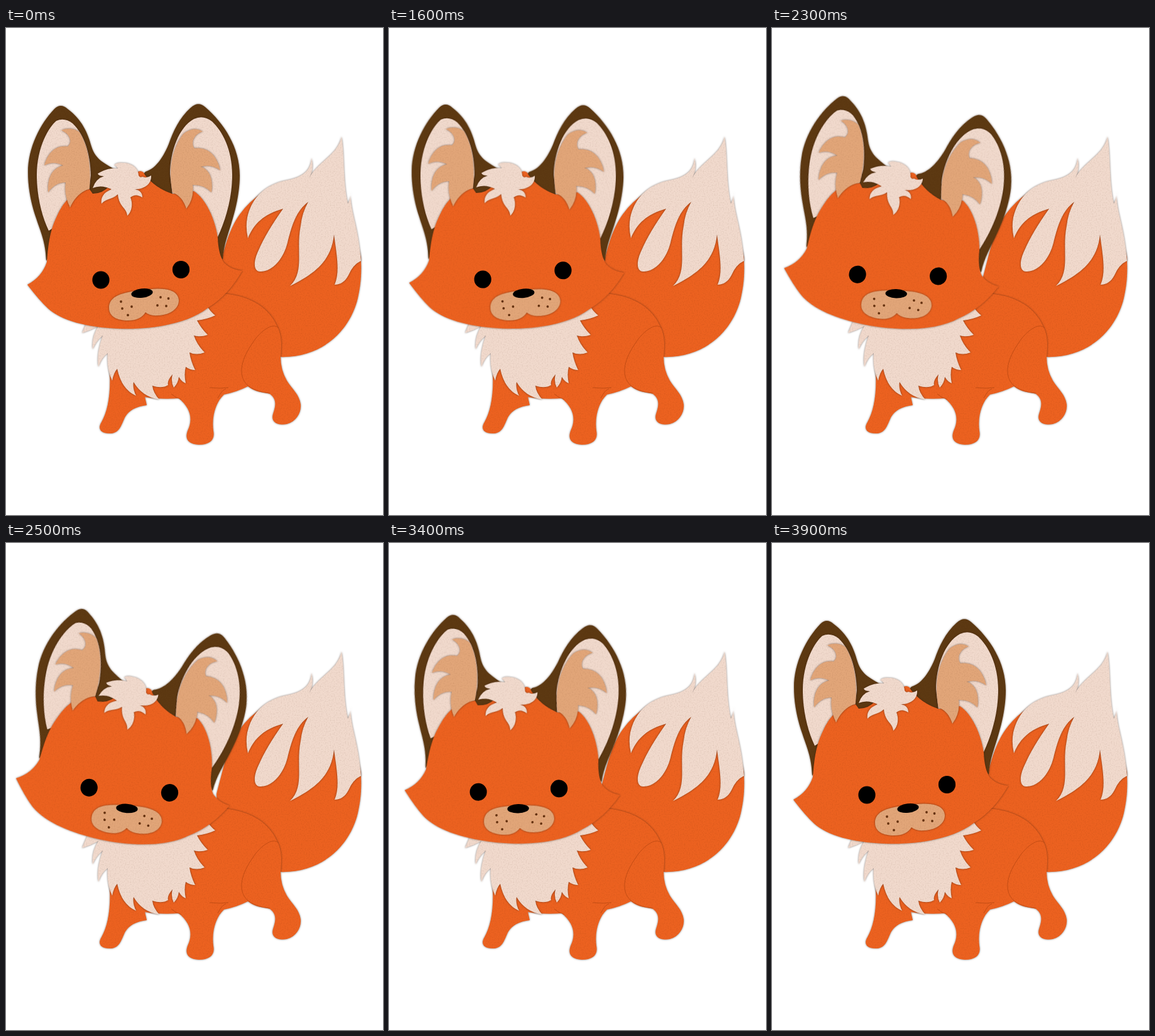
Animation, 600 px wide and 776 px high, one loop 8000 ms. Source, as an HTML page:

```html
<!DOCTYPE html>
<html lang="en">
<head>
<meta charset="utf-8">
<title>Paper fox</title>
<style>
  html, body { margin: 0; width: 100%; height: 100%; overflow: hidden; background: #fff; }
  svg { display: block; width: 100%; height: 100%; }
  .cut { filter: url(#paper); }
  .orange { fill: #ec6220; }
  .cream { fill: #f1dacd; }
  .tan { fill: #e2a679; }
  .brown { fill: #5d3912; }
  .fold { fill: none; stroke: #a83f0c; stroke-width: 1; opacity: .6; filter: url(#soft); }
</style>
</head>
<body>
<svg viewBox="0 0 600 776">
  <defs>
    <filter id="paper" x="-8%" y="-8%" width="116%" height="116%" color-interpolation-filters="sRGB">
      <feTurbulence type="fractalNoise" baseFrequency=".5" numOctaves="2" seed="4"/>
      <feColorMatrix values="0 0 0 0 .25  0 0 0 0 .08  0 0 0 0 0  .2 0 0 0 -.09"/>
      <feComposite in2="SourceGraphic" operator="in" result="grain"/>
      <feGaussianBlur in="SourceAlpha" stdDeviation="1.4"/>
      <feColorMatrix values="0 0 0 0 .2  0 0 0 0 .1  0 0 0 0 .05  0 0 0 .6 0" result="shade"/>
      <feMerge>
        <feMergeNode in="shade"/>
        <feMergeNode in="SourceGraphic"/>
        <feMergeNode in="grain"/>
      </feMerge>
    </filter>
    <filter id="soft" x="-10%" y="-10%" width="120%" height="120%"><feGaussianBlur stdDeviation=".6"/></filter>
  </defs>

  <g id="tail">
    <path class="cut orange" d="M335 400 C346 360 352 325 372 297 Q387 276 410 261 L500 240 L540 320
      Q566 350 565 372 C566 395 564 412 560 430 C547 485 500 527 434 524 L340 480Z"/>
    <path class="cut cream" d="M385 335 Q381 318 384 302 C393 262 422 247 450 242 C474 237 486 225 486 207
      Q491 224 482 240 C496 213 528 203 534 173 C539 205 536 245 544 280 Q549 272 548 261
      C548 295 560 312 565 371 Q552 377 545 394 Q537 409 523 409 C532 388 526 360 522 329
      C518 372 490 392 452 411 C476 388 461 355 469 315 Q471 295 481 277 C462 291 455 314 448 342
      C442 367 424 389 404 388 C393 387 394 371 402 354 Q414 326 441 288 C410 297 395 311 385 335Z"/>
  </g>

  <g id="body">
    <path class="cut orange" d="M165 500 L165 548 C167 583 162 611 152 628 C145 639 151 647 167 646
      C182 645 184 630 190 619 Q199 604 224 601 L221 588 Q245 592 275 590
      C294 606 298 623 289 642 C284 656 291 663 307 664 C324 664 333 657 330 642
      C327 618 334 596 347 584 Q367 580 385 571 C398 581 410 580 420 583
      C433 593 428 605 425 615 C421 628 432 634 447 631 C462 627 470 613 469 600
      C467 584 455 575 447 562 Q437 545 437 524 C439 503 439 488 430 472 C415 441 383 426 345 423 L180 450Z"/>
    <path class="fold" d="M434 478 C424 468 404 484 393 501 C376 525 367 552 384 569 Q396 580 420 582"/>
    <path class="fold" d="M354 573 Q339 575 324 573 M350 575 Q343 577 337 590 M263 583 Q269 589 279 592"/>
    <path class="cut cream" d="M130 465 L121 486 Q134 482 147 475 Q136 492 138 512 Q143 499 154 490
      Q144 518 147 540 Q152 525 162 518 Q160 543 169 562 Q171 550 177 543 Q184 576 207 586
      Q201 574 203 564 Q217 588 244 592 Q234 581 233 570 Q248 575 258 569 Q256 562 265 552
      Q262 563 267 573 Q274 566 275 556 Q280 564 286 566 Q283 552 286 540 Q293 545 301 545
      Q294 531 292 517 Q303 522 316 517 Q304 505 299 490 Q309 493 321 489 Q310 478 304 466
      Q320 464 333 458 Q325 452 318 440Z"/>
  </g>

  <g id="head">
    <path class="cut brown" d="M64 371 C63 340 55 325 48 303 C40 280 35 255 35 230 C35 190 55 152 77 129
      Q87 119 98 129 C121 146 130 167 136 189 C143 211 157 215 174 226 L190 280 L100 310Z"/>
    <path class="cut brown" d="M345 369 C346 345 355 325 361 303 C368 280 372 255 372 235 C372 190 347 152 317 126
      Q306 116 294 127 C276 143 266 165 259 185 C252 202 240 224 222 229 L212 240 L240 290 L320 340Z"/>
    <path class="cut cream" d="M68 323 C57 300 49 268 49 234 C49 190 68 158 80 148 Q93 142 106 152
      C126 171 134 202 135 235 L130 275 L90 310Z"/>
    <path class="cut cream" d="M337 333 C350 305 360 270 360 234 C360 193 344 164 328 149 Q314 138 299 145
      C275 158 261 197 261 233 L266 275 L310 310Z"/>
    <path class="cut orange" d="M65 373 C67 348 69 325 80 302 Q89 280 106 265 Q117 259 133 257 L138 264
      Q154 264 164 252 L202 240 Q206 229 213 228 Q219 228 221 234 Q230 245 240 252 Q250 259 264 264
      Q284 265 299 260 C318 272 333 305 337 334 Q338 361 347 374 Q358 385 376 387
      C361 413 344 432 320 447 C290 470 235 481 179 479 C128 477 88 466 67 447 Q53 434 34 409 Q57 397 65 373Z"/>
    <path class="cut tan" d="M88 163 Q104 157 117 166 C129 186 136 215 133 256 Q112 263 102 286
      Q92 266 95 246 Q78 246 67 262 C66 240 72 224 91 219 Q75 211 61 219 C66 200 79 186 98 189
      C107 181 101 168 88 163Z"/>
    <path class="cut tan" d="M313 165 Q298 156 282 169 C266 191 257 220 265 262 Q281 268 287 288
      Q300 271 297 250 Q315 249 327 262 C330 240 324 226 310 221 Q327 216 341 227
      C336 203 321 189 300 192 C293 183 299 169 313 165Z"/>
    <path class="cut cream" d="M172 219 Q176 214 186 215 C200 215 211 223 211 235 Q213 239 217 237
      Q224 240 231 235 C232 249 220 257 205 257 Q217 259 217 270 Q206 263 198 270
      C203 282 199 294 193 299 C192 286 180 286 178 265 C170 273 160 271 152 280
      C150 268 158 261 168 257 Q152 249 138 255 Q143 240 156 236 Q147 236 146 232
      C158 225 166 223 178 224 Q176 219 172 219Z"/>

    <g id="eyes">
      <ellipse cx="151" cy="401.5" rx="13.6" ry="14"/>
      <ellipse cx="278.5" cy="385" rx="13.6" ry="14"/>
    </g>
    <g id="lids" fill="none" stroke="#000" stroke-width="3" stroke-linecap="round">
      <path d="M136 404 Q152 416 166 400"/>
      <path d="M264 388 Q280 399 292 384"/>
    </g>

    <path class="cut tan" d="M164 446 C164 427 185 421 216 418 C244 413 274 414 275 434
      C275 449 258 458 241 458 Q229 459 222 453 Q214 466 194 466 C177 466 164 460 164 446Z"/>
    <ellipse cx="216.5" cy="422.5" rx="17.2" ry="7.3" transform="rotate(-7 216.5 422.5)"/>
    <g id="dots" fill="#64310f"></g>
  </g>
</svg>
<script>
  const LOOP = 8000, STEP = 100, STEPS = 10;
  const PIVOT = "202 298";
  const byId = id => document.getElementById(id);
  const head = byId("head"), eyes = byId("eyes"), lids = byId("lids");

  const freckles = [[183, 436], [200, 444], [185, 447], [194, 457.5], [246, 429], [258.5, 431], [241, 442], [255, 443]];
  byId("dots").innerHTML = freckles.map(([x, y]) => `<circle cx="${x}" cy="${y}" r="1.9"/>`).join("");

  const stepsSince = (t, start) =>
    Math.max(0, Math.min(STEPS, Math.floor((t - start) / STEP) + 1));

  // Head tilt in degrees, slightly faster in its second half.
  const tilt = n => n + Math.max(0, n - 5) * .2;

  let shown = "";
  function draw(t) {
    const n = stepsSince(t, 1600) - stepsSince(t, 3000);
    const blink = t >= 500 && t < 600;
    const pose = n + "|" + blink;
    if (pose === shown) return;
    shown = pose;
    head.setAttribute("transform", `rotate(${tilt(n)} ${PIVOT})`);
    eyes.style.display = blink ? "none" : "";
    lids.style.display = blink ? "" : "none";
  }

  const origin = performance.now();
  function tick() {
    draw((performance.now() - origin) % LOOP);
    requestAnimationFrame(tick);
  }
  tick();
</script>
</body>
</html>
```
